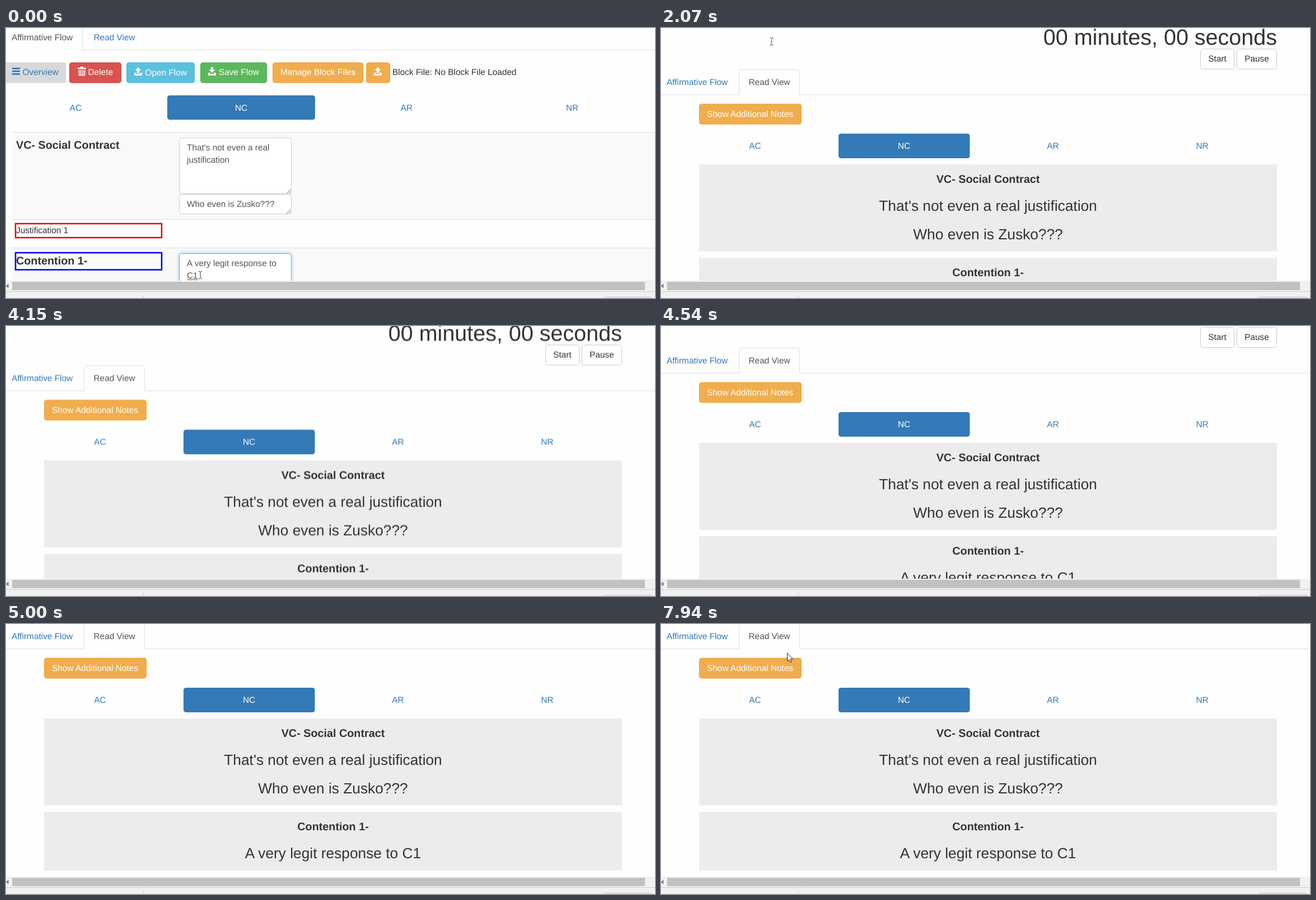
An HTML page that plays this animation: 1159x483 px, repeating every 8000 ms.

```html
<!DOCTYPE html>
<html lang="en">
<head>
<meta charset="utf-8">
<title>Debate flow</title>
<style>
html, body { margin: 0; width: 100%; height: 100%; overflow: hidden; background: #fefefe; }
svg { display: block; }
text { font: 15.4px "Liberation Sans", Arial, sans-serif; fill: #333; text-rendering: geometricPrecision; }
.mid { text-anchor: middle; }
.end { text-anchor: end; }
.h4 { font-size: 19.8px; font-weight: bold; }
.h3 { font-size: 26.3px; }
.h1 { font-size: 39.5px; }
.link { fill: #337ab7; }
.white, .white text { fill: #fff; }
.dim { fill: #555; }
.line { fill: none; stroke: #ddd; }
.field { fill: #fff; stroke: #ccc; }
.block { fill: #ececec; }
.pill { fill: #337ab7; }
.orange { fill: #f0ad4e; stroke: #eea236; }

/* Every track shares one 8 s loop with hard steps. */
.track { animation: 8s step-end infinite; }
#flow { animation-name: flow; }
#read { animation-name: read; }
#scroll { animation-name: scroll; }
#hover { animation-name: hover; }
#focus { animation-name: focus; }
#caret { animation-name: caret; }
#start { animation-name: start; }
#arrow { animation-name: arrow; }
#beam { animation-name: beam; }

@keyframes flow { 0% { opacity: 1 } 25.875%, 100% { opacity: 0 } }
@keyframes read { 0% { opacity: 0 } 25.875%, 100% { opacity: 1 } }
@keyframes hover { 0% { opacity: 0 } 7.375%, 100% { opacity: 1 } }
@keyframes focus { 0% { opacity: 1 } 24.125%, 100% { opacity: 0 } }
@keyframes caret { 0% { opacity: 0 } 15.25% { opacity: 1 } 21.875%, 100% { opacity: 0 } }
@keyframes start {
  0% { fill: #fff; stroke: #ccc }
  41.25% { fill: #e6e6e6; stroke: #adadad }
  44.125%, 100% { fill: #fff; stroke: #ccc }
}
@keyframes scroll {
  0% { transform: translateY(0) }
  51.875% { transform: translateY(-3.5px) }
  53.125% { transform: translateY(-8px) }
  54.25% { transform: translateY(-15px) }
  55.5% { transform: translateY(-24px) }
  56.75% { transform: translateY(-35px) }
  57.75% { transform: translateY(-52px) }
  58.75% { transform: translateY(-71px) }
  62.5%, 100% { transform: translateY(-75px) }
}
@keyframes arrow {
  0% { transform: translate(-50px, -50px) }
  5.5% { transform: translate(250px, 200px) }
  6.375% { transform: translate(116px, 60px) }
  7.375% { transform: translate(-50px, -50px) }
  11.375% { transform: translate(178px, 23px) }
  12.375% { transform: translate(181px, 27px) }
  13.375% { transform: translate(183px, 29px) }
  15.25% { transform: translate(185px, 29px) }
  16.25% { transform: translate(188px, 29px) }
  17.125% { transform: translate(191px, 28px) }
  18.125% { transform: translate(194px, 26px) }
  19.125% { transform: translate(-50px, -50px) }
  34.5% { transform: translate(235px, 58px) }
  35.5% { transform: translate(410px, 108px) }
  36.5% { transform: translate(508px, 124px) }
  39.375% { transform: translate(690px, 112px) }
  40.375% { transform: translate(870px, 85px) }
  41.25% { transform: translate(972px, 62px) }
  42.25% { transform: translate(992px, 53px) }
  44.125% { transform: translate(1050px, 78px) }
  45% { transform: translate(1123px, 116px) }
  46% { transform: translate(-50px, -50px) }
  89.625% { transform: translate(972px, 195px) }
  90.625% { transform: translate(875px, 195px) }
  93.5% { transform: translate(650px, 146px) }
  94.5% { transform: translate(420px, 80px) }
  95.375% { transform: translate(305px, 51px) }
  98.25% { transform: translate(258px, 51px) }
  99.25%, 100% { transform: translate(225px, 51.5px) }
}
@keyframes beam {
  0% { transform: translate(347px, 442px) }
  5.5% { transform: translate(-50px, -50px) }
  7.375% { transform: translate(177.5px, 15px) }
  11.375% { transform: translate(-50px, -50px) }
  19.125% { transform: translate(198.5px, 25px) }
  21.875% { transform: translate(197.5px, 24px) }
  34.5%, 100% { transform: translate(-50px, -50px) }
}
</style>
</head>
<body>
<svg width="1159" height="483" viewBox="0 0 1159 483">
  <defs>
    <path id="up" d="M7 0L12.5 6H9V10.500H5V6H1.500ZM0 10H3.500V12H10.500V10H14V15H0Z"/>
    <path id="down" d="M5 0H9V4.500H12.500L7 10.500L1.500 4.500H5ZM0 10H3.500V12H10.500V10H14V15H0Z"/>
    <path id="grip" d="M0 7L7 0M4 7L7 4" fill="none" stroke="#666"/>
  </defs>
  <rect width="1159" height="483" fill="#fefefe"/>

  <g id="flow" class="track">
    <g id="hover" class="track">
      <path d="M139 0H247.500V38.500H139Z" fill="#eee"/>
    </g>
    <path class="line" d="M136.500 0V39.500M136 39H1159"/>
    <text class="dim" x="10" y="22">Affirmative Flow</text>
    <text class="link" x="156.500" y="22">Read View</text>

    <rect x="-8" y="61.500" width="115" height="37" rx="4" fill="#d9d9d9"/>
    <path class="link" d="M11 71h14v2.800h-14zM11 76h14v2.800h-14zM11 81h14v2.800h-14z"/>
    <text class="link" x="29.500" y="84">Overview</text>

    <rect x="113.500" y="62" width="92" height="36" rx="4" fill="#d9534f" stroke="#d43f3a"/>
    <rect x="215.500" y="62" width="121" height="36" rx="4" fill="#5bc0de" stroke="#46b8da"/>
    <rect x="347.500" y="62" width="118" height="36" rx="4" fill="#5cb85c" stroke="#4cae4c"/>
    <rect class="orange" x="476.500" y="62" width="161" height="36" rx="4"/>
    <rect class="orange" x="643.500" y="62" width="42" height="36" rx="4"/>
    <g class="white">
      <path d="M128 71H133V69H138V71H143V73.500H128Z"/>
      <path d="M130.500 75V84.500H140.500V75M133.700 75V84M137.300 75V84" fill="none" stroke="#fff" stroke-width="1.700"/>
      <use href="#up" x="229" y="70"/>
      <use href="#down" x="361" y="70"/>
      <use href="#up" x="657" y="70"/>
      <text x="146.500" y="84">Delete</text>
      <text x="248.500" y="85">Open Flow</text>
      <text x="380" y="84">Save Flow</text>
      <text x="490" y="84">Manage Block Files</text>
    </g>
    <text x="690" y="84">Block File: No Block File Loaded</text>

    <rect class="pill" x="288" y="120.500" width="264" height="43.500" rx="4.400"/>
    <g class="mid">
      <text class="link" x="124.500" y="147.500">AC</text>
      <text class="white" x="420" y="147.500">NC</text>
      <text class="link" x="715.500" y="147.500">AR</text>
      <text class="link" x="1011" y="147.500">NR</text>
    </g>

    <path d="M10 186.500H1159V342H10ZM10 393.500H1159V453H10Z" fill="#f9f9f9"/>
    <path class="line" d="M10 186.500H1159M10 342.500H1159M10 393.500H1159"/>
    <text class="h4" x="18" y="216">VC- Social Contract</text>
    <rect x="17" y="350" width="261" height="25" fill="none" stroke="#f00000" stroke-width="2.500"/>
    <text x="18" y="367">Justification 1</text>
    <rect x="17" y="402" width="261" height="30.500" fill="none" stroke="#0000e6" stroke-width="2.500"/>
    <text class="h4" x="18" y="423">Contention 1-</text>

    <rect class="field" x="309.500" y="196.500" width="200" height="100" rx="4"/>
    <rect class="field" x="309.500" y="297.500" width="200" height="35" rx="4"/>
    <rect class="field" x="309.500" y="403.500" width="200" height="80" rx="4"/>
    <rect id="focus" class="track" x="309.500" y="403.500" width="200" height="80" rx="4"
      fill="#fff" stroke="#66afe9" style="filter: drop-shadow(0 0 3px rgba(102, 175, 233, .6))"/>
    <use href="#grip" x="501.500" y="288.500"/>
    <use href="#grip" x="501.500" y="324.500"/>
    <text class="dim" x="323" y="218.500">That's not even a real</text>
    <text class="dim" x="323" y="240.500">justification</text>
    <text class="dim" x="323" y="319.500">Who even is Zusko???</text>
    <text class="dim" x="323" y="426">A very legit response to</text>
    <text class="dim" x="323" y="448">C1</text>
    <path d="M323 451l2-2l2 2l2-2l2 2l2-2l2 2l2-2l2 2l2-2l2 2" fill="none" stroke="#f55" stroke-width="1.100"/>
    <path id="caret" class="track" d="M343.500 431V451" stroke="#333"/>
  </g>

  <g id="read" class="track">
    <g id="scroll" class="track">
      <text class="h1 end" x="1100" y="30">00 minutes, 00 seconds</text>
      <rect id="start" class="track" x="963.500" y="37.500" width="60" height="36" rx="4"/>
      <rect class="field" x="1028.500" y="37.500" width="71" height="36" rx="4"/>
      <text class="mid" x="993.500" y="60">Start</text>
      <text class="mid" x="1064" y="60">Pause</text>

      <path class="line" d="M0 119.500H139.500V78.500Q139.500 74.500 143.500 74.500H243Q247.500 74.500 247.500 78.500V119.500H1159"/>
      <text class="link" x="10" y="102">Affirmative Flow</text>
      <text class="dim" x="156.500" y="102">Read View</text>

      <rect class="orange" x="68.500" y="136" width="182" height="36" rx="4"/>
      <text class="white" x="82" y="159">Show Additional Notes</text>

      <rect class="pill" x="317" y="189" width="234.500" height="44" rx="4.400"/>
      <g class="mid">
        <text class="link" x="168" y="216">AC</text>
        <text class="white" x="434" y="216">NC</text>
        <text class="link" x="700" y="216">AR</text>
        <text class="link" x="966.500" y="216">NR</text>
      </g>

      <rect class="block" x="68" y="244" width="1032" height="155.500"/>
      <rect class="block" x="68" y="411" width="1032" height="105"/>
      <g class="mid">
        <text class="h4" x="584" y="276.500">VC- Social Contract</text>
        <text class="h3" x="584" y="327">That's not even a real justification</text>
        <text class="h3" x="584" y="378">Who even is Zusko???</text>
        <text class="h4" x="584" y="443.500">Contention 1-</text>
        <text class="h3" x="584" y="494">A very legit response to C1</text>
      </g>
    </g>
  </g>

  <g>
    <rect y="452" width="1159" height="31" fill="#f1f1f1"/>
    <rect x="11" y="454" width="1130" height="15" fill="#c1c1c1"/>
    <path d="M0 461.500L4.500 457.500V465.500Z" fill="#777"/>
    <path d="M0 471.500H1159M245.500 478V483" stroke="#ccc"/>
    <path d="M1067.500 483Q1068 481.500 1070 481.500H1151Q1153 481.500 1153.500 483" fill="#f8f8f8" stroke="#bbb"/>
  </g>

  <path id="arrow" class="track" d="M.5 .5V15L3.700 12L6 17.300L8.200 16.300L6 11.200H10.300Z" fill="#fff" stroke="#222"/>
  <path id="beam" class="track" d="M-3 -6.500H-1L0 -5.500L1 -6.500H3M0 -5.500V5.500M-3 6.500H-1L0 5.500L1 6.500H3" fill="none" stroke="#333"/>
</svg>
</body>
</html>
```
